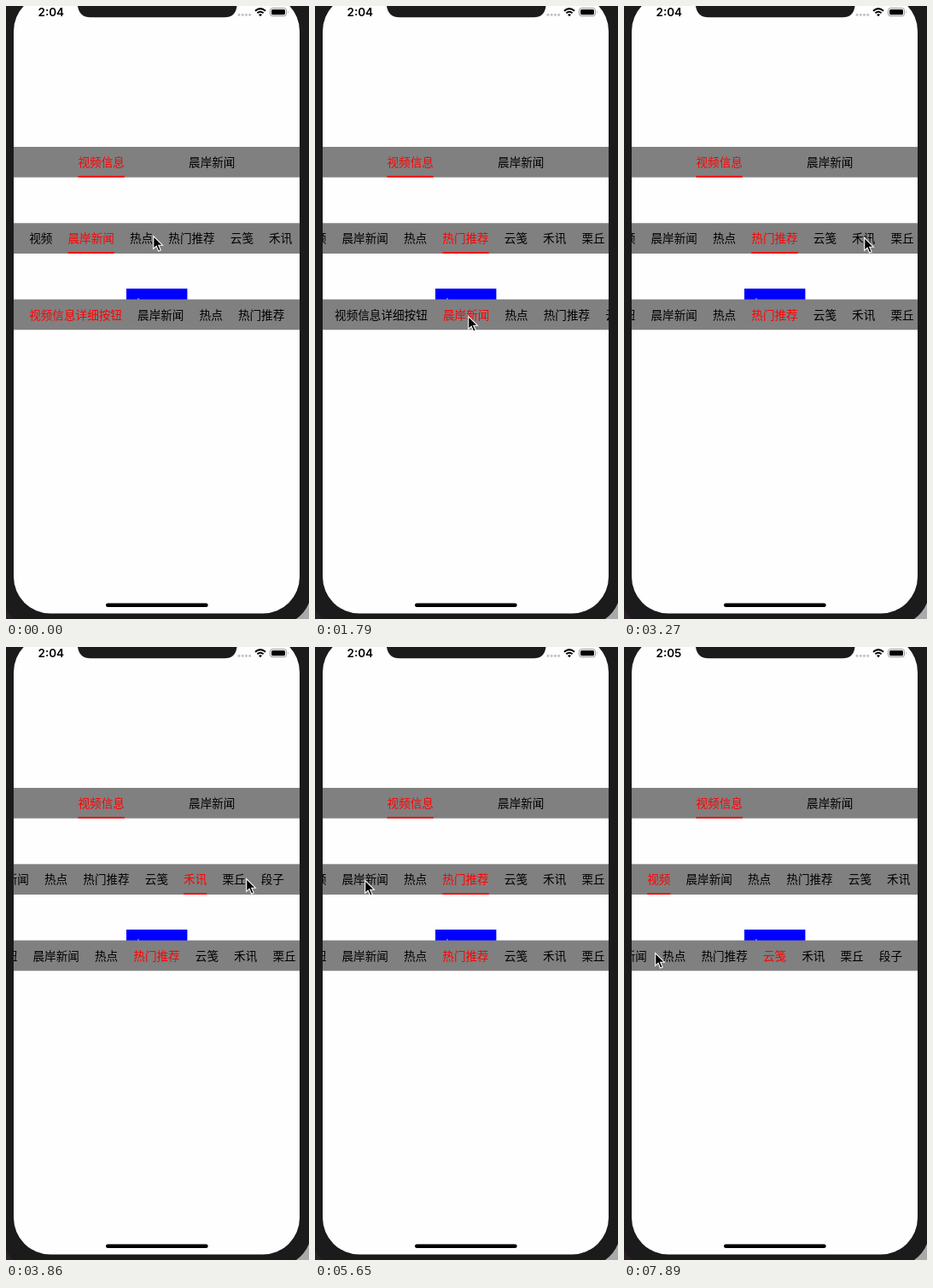
These frames come from a looping animation (355x718 px, 8 s). An HTML page:

```html
<!DOCTYPE html>
<html lang="zh">
<head>
<meta charset="utf-8">
<style>
html, body { margin: 0; width: 100%; height: 100%; overflow: hidden; background: #1b1b1c; }
svg { display: block; }
text { font: 13.6px "Noto Sans CJK SC", "Noto Sans CJK", sans-serif; }
#clock { font: 600 13.5px Inter, sans-serif; }
.bar { fill: #808080; }
.line, .on { fill: #f00; }
</style>
</head>
<body>
<svg width="355" height="718" viewBox="0 0 355 718">
  <defs><clipPath id="screen"><rect x="9" y="-13.500" width="335" height="725" rx="43"/></clipPath></defs>
  <path d="M355 699Q350 711 340 718H355Z" fill="#aaa"/>
  <path d="M0 706Q3 713 9 718H0Z" fill="#2a2028"/>
  <g clip-path="url(#screen)">
    <rect width="355" height="718" fill="#fefefe"/>
    <rect x="141" y="331" width="71.400" height="14" fill="#00f"/>
    <rect x="154" y="342.500" width="2" height="1" fill="#ccf"/>
    <g id="rows"></g>
    <path d="M84 -1V0Q86 13.300 99 13.300H256Q269 13.300 270.500 0V-1Z" fill="#1b1b1c"/>
    <text id="clock" x="37.500" y="12"></text>
    <path d="M273 10.300H287" stroke="#c4c4c4" stroke-width="3.200" stroke-linecap="round" stroke-dasharray="0 4.230"/>
    <g fill="none" stroke="#000" stroke-width="2">
      <path d="M292 5.800Q298 .400 304 5.800"/><path d="M294.400 8.300Q298 5.200 301.600 8.300"/>
    </g>
    <path d="M296 10L298 12.200L300 10Q298 8.300 296 10Z"/>
    <rect x="309.500" y="2.500" width="19" height="9.300" rx="2.700" fill="none" stroke="#999"/>
    <rect x="311" y="4" width="16" height="6.300" rx="1.500"/>
    <path d="M330 5.500Q331.500 7 330 8.700Z" fill="#999"/>
    <rect x="117" y="699.500" width="119.700" height="4.600" rx="2.300"/>
  </g>
  <path id="cursor" d="M.7 .5V15.300L4.100 12.100L6.600 18L9.200 16.900L6.700 11.200H11.300Z" stroke="#fff" stroke-width="1.100"/>
</svg>
<script>
const LOOP = 8000, STEP = 148.6;      // the screen refreshes every STEP ms
const LEFT = 27.2, RIGHT = 344, MID = 176.5, CHAR = 13.6, GAP = 18.1;
const $ = id => document.getElementById(id);
const clamp = (v, a, b) => Math.min(b, Math.max(a, v));
const mix = (a, b, k) => a + (b - a) * k;
const ease = x => (1 - Math.cos(Math.PI * clamp(x, 0, 1))) / 2;

function add(parent, tag, attrs, label = '') {
  const el = document.createElementNS('http://www.w3.org/2000/svg', tag);
  for (const key in attrs) el.setAttribute(key, attrs[key]);
  el.textContent = label;
  return parent.appendChild(el);
}

// taps: [time, tab index]; a tap centres its tab and slides the underline there
function tabRow(n, labels, taps, { underline = true, left = LEFT, gap = GAP } = {}) {
  const y = 165 + 89.3 * n;
  const row = add($('rows'), 'g', {});
  add(row, 'rect', { class: 'bar', x: 9, y, width: 335, height: 35.7 });
  const strip = add(row, 'g', {});
  let x = left;
  const tabs = labels.map(label => {
    const w = label.length * CHAR;
    const tab = { w, mid: x + w / 2, el: add(strip, 'text', { x, y: y + 23 }, label) };
    x += w + gap;
    return tab;
  });
  const maxScroll = Math.max(0, x - RIGHT);
  const line = underline && add(strip, 'rect', { class: 'line', y: y + 33.9, height: 1.8 });
  const scrollTo = tab => clamp(tab.mid - MID, 0, maxScroll);

  return t => {
    const i = taps.findLastIndex(tap => tap[0] <= t);
    const [start, index] = taps[i];
    const now = tabs[index], old = tabs[taps[Math.max(0, i - 1)][1]];
    const scroll = mix(scrollTo(old), scrollTo(now), ease((t - start) / 320));
    strip.setAttribute('transform', `translate(${-scroll})`);
    tabs.forEach(tab => tab.el.setAttribute('class', tab === now ? 'on' : ''));
    if (line) {
      line.setAttribute('x', mix(old.mid, now.mid, ease((t - start) / 240)) - now.w / 2);
      line.setAttribute('width', now.w);
    }
  };
}

const news = '晨岸新闻';
const tail = [news, '热点', '热门推荐', '云笺', '禾讯', '栗丘', '段子'];
const rows = [
  tabRow(0, ['视频信息', news], [[0, 0]], { left: 84.5, gap: 75.2 }),
  tabRow(1, ['视频', ...tail],
    [[-999, 1], [670, 3], [3350, 5], [4575, 7], [5140, 3], [5720, 1], [6472, 0]]),
  tabRow(2, ['视频信息详细按钮', ...tail],
    [[-999, 0], [1540, 1], [2290, 3], [7220, 4]], { underline: false })
];

// pointer stops: arrival time, x, y, travel time
const stops = [
  [0, 172, 269], [430, 225, 274], [1330, 179, 363, 580], [2220, 285, 364], [2670, 287, 349],
  [3110, 281, 271], [4010, 315, 275, 140], [4750, 279, 276, 140], [5200, 118, 274],
  [5640, 58, 273], [6535, 116, 310, 140], [6980, 231, 364], [7870, 36, 358, 580]
];

function pointer(t) {
  const i = stops.findLastIndex(stop => stop[0] <= t);
  const [, x, y] = stops[i];
  const [at, nextX, nextY, travel = 440] = stops[i + 1] || [Infinity, x, y];
  const k = ease((t - at) / travel + 1);
  return [mix(x, nextX, k), mix(y, nextY, k)];
}

function draw(ms) {
  const t = Math.floor((ms % LOOP + 6) / STEP) * STEP;
  rows.forEach(row => row(t));
  $('clock').textContent = t < 6530 ? '2:04' : '2:05';
  $('cursor').setAttribute('transform', `translate(${pointer(t)})`);
}

let begin;
function tick(now) {
  begin ??= now;
  draw(now - begin);
  requestAnimationFrame(tick);
}
draw(0);
requestAnimationFrame(tick);
</script>
</body>
</html>
```
